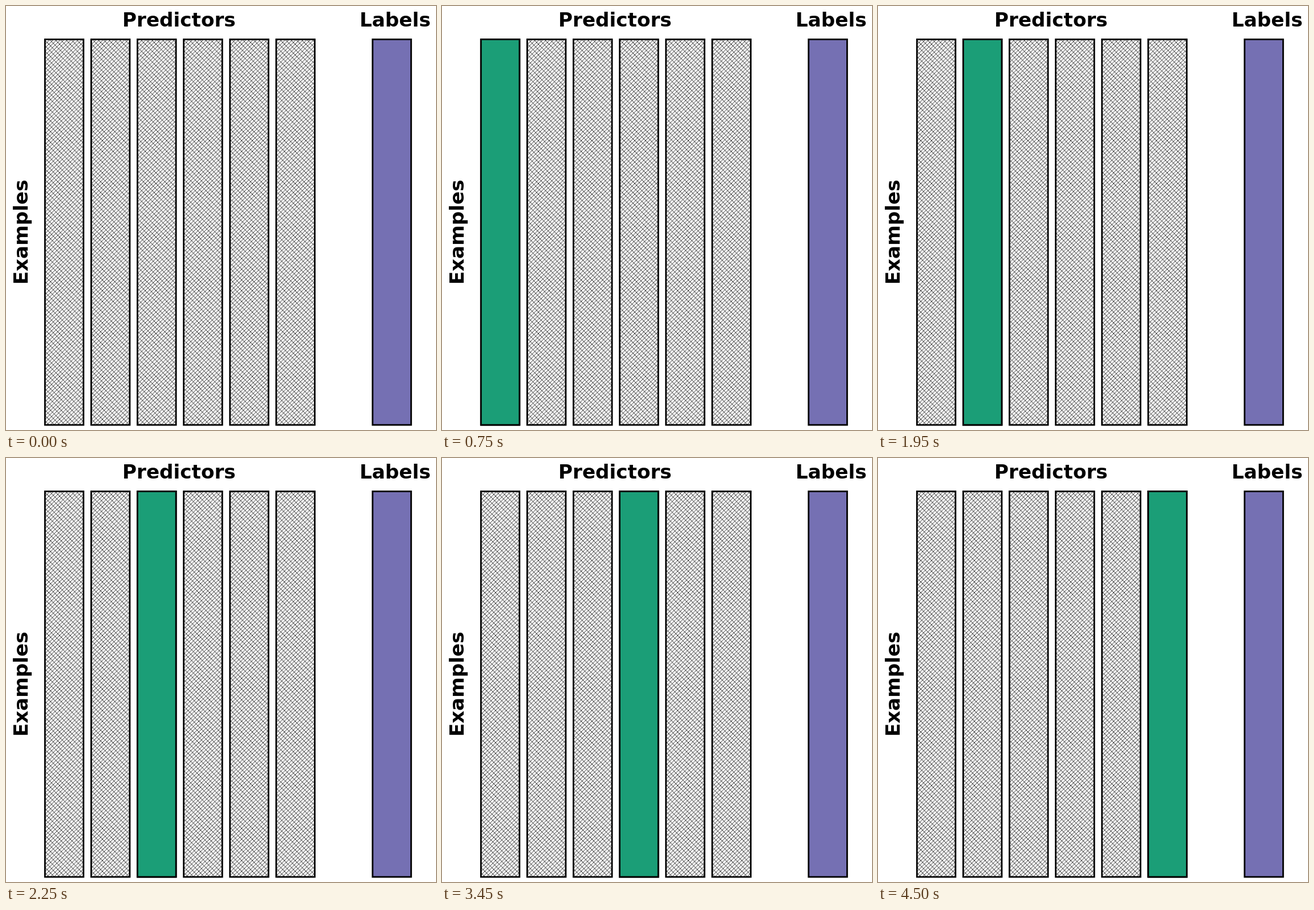
Write an HTML page that moves like this. It is 754 px wide and 743 px high and loops after 5250 ms.

```html
<!DOCTYPE html>
<html lang="en">
<head>
<meta charset="utf-8">
<title>Predictors and labels</title>
<style>
  html, body { margin: 0; width: 100%; height: 100%; overflow: hidden; background: #fff; }
  svg { display: block; width: 754px; height: 743px; }
  text { font: bold 34.2px "DejaVu Sans", sans-serif; }
  .bar { stroke: #000; stroke-width: 2.8; }
  .hatched { fill: url(#hatch); }
  .label { fill: #7570b3; }
  .active {
    fill: #1b9e77;
    opacity: 0;
    animation: pick 5250ms step-end infinite;
    animation-delay: calc((var(--i) - 6) * 750ms);
  }
  /* Each column is lit for one seventh of the loop. */
  @keyframes pick {
    0% { opacity: 0; }
    85.7143% { opacity: 1; }
    100% { opacity: 0; }
  }
</style>
</head>
<body>
<svg viewBox="0 0 754 743">
  <defs>
    <pattern id="hatch" width="18.78" height="18.78" y="743" patternUnits="userSpaceOnUse">
      <rect width="18.78" height="18.78" fill="#fff"/>
      <path id="strokes" fill="none" stroke="#000" stroke-width="0.85"/>
    </pattern>
  </defs>
  <text x="204" y="36">Predictors</text>
  <text x="620" y="36">Labels</text>
  <text transform="translate(37.6 488.3) rotate(-90)">Examples</text>
  <g id="columns"></g>
  <rect class="bar label" x="642.8" y="58.5" width="67.6" height="675.6"/>
</svg>
<script>
  const tile = 18.78;
  const columns = document.getElementById("columns");

  // Evenly spaced diagonals, overrunning the tile so the seams join.
  function diagonals(count, dir) {
    let d = "";
    for (let k = -count; k <= 2 * count; k++) {
      const x = k * tile / count;
      d += `M${x - dir * tile} ${2 * tile}L${x + 2 * dir * tile} ${-tile}`;
    }
    return d;
  }

  function addBar(i, kind) {
    const bar = document.createElementNS(columns.namespaceURI, "rect");
    const box = { class: `bar ${kind}`, x: 68.3 + 81.1 * i, y: 58.5, width: 67.6, height: 675.6 };
    for (const key in box) bar.setAttribute(key, box[key]);
    bar.style.setProperty("--i", i + 1);
    columns.append(bar);
  }

  document.getElementById("strokes").setAttribute("d", diagonals(3, 1) + diagonals(2, -1));
  for (let i = 0; i < 6; i++) {
    addBar(i, "hatched");
    addBar(i, "active");
  }
</script>
</body>
</html>
```
